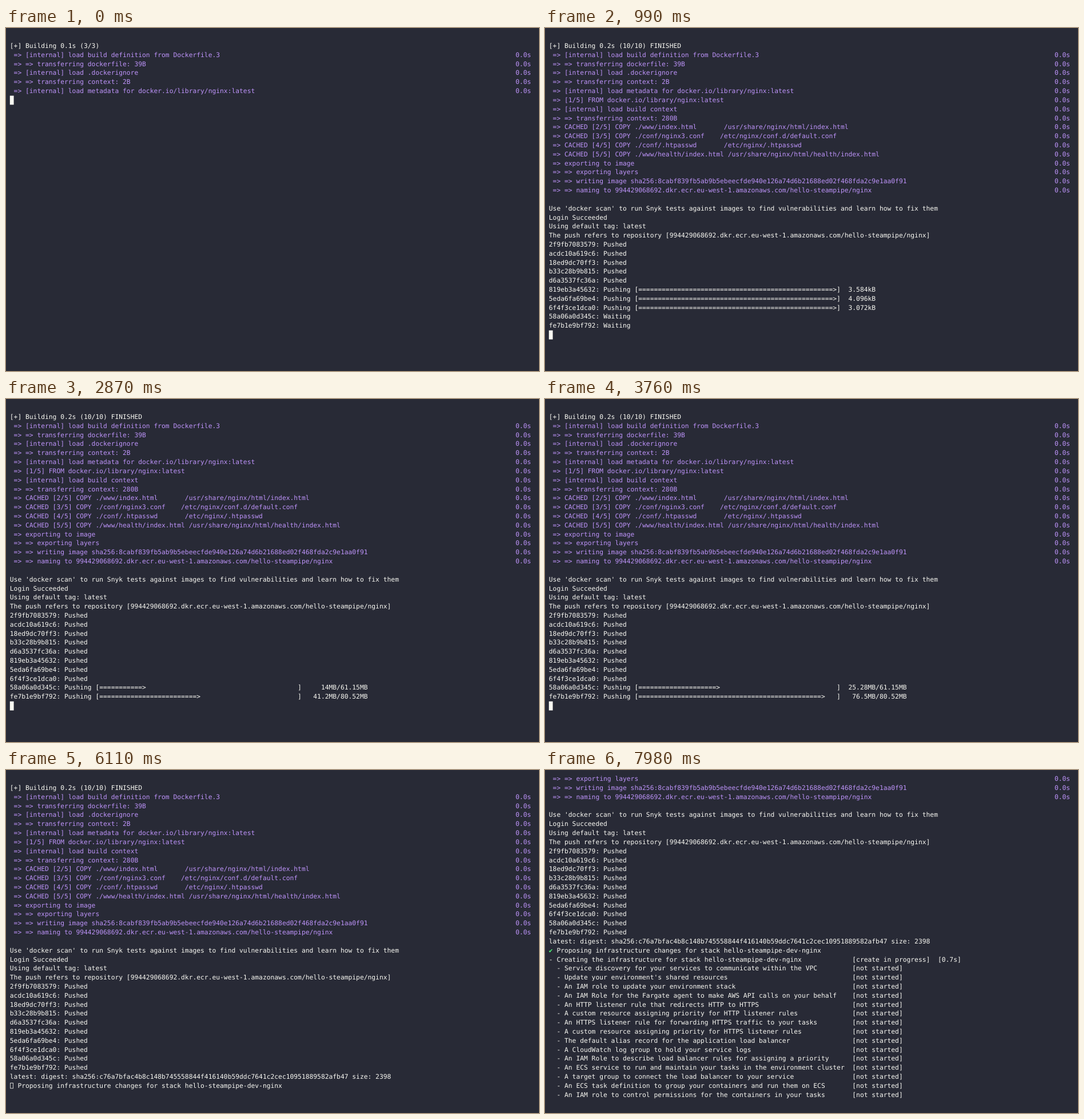
An HTML page for the animation above (8 s loop, 932x601 px).

```html
<!DOCTYPE html>
<html lang="en">
<head>
<meta charset="utf-8">
<title>Container build and deploy</title>
<style>
html, body { margin: 0; width: 100%; height: 100%; overflow: hidden; background: #282a36; }
svg { display: block; width: 932px; height: 601px; }
text {
  font: 11.3px "DejaVu Sans Mono", monospace;
  font-variant-ligatures: none;
  text-rendering: geometricPrecision;
  white-space: pre;
}
</style>
</head>
<body>
<svg id="stage" viewBox="0 0 932 601" xmlns="http://www.w3.org/2000/svg"></svg>
<script>
// The margin is one cell left and right, half a row above and below.
const LOOP = 8000, COLS = 135, ROWS = 37;
const CELL = 932 / (COLS + 2), ROW_H = 601 / (ROWS + 1), LEFT = CELL, TOP = ROW_H / 2;
const BASE = 11.3;
const WHITE = '#f8f8f2', PURPLE = '#bd93f9', GREEN = '#50fa7b';
const REPO = '994429068692.dkr.ecr.eu-west-1.amazonaws.com/hello-steampipe/nginx';
const STACK = 'hello-steampipe-dev-nginx';
const SPIN_ROW = 34;

const BUILD = [
  '[internal] load build definition from Dockerfile.3',
  '=> transferring dockerfile: 39B',
  '[internal] load .dockerignore',
  '=> transferring context: 2B',
  '[internal] load metadata for docker.io/library/nginx:latest',
  '[1/5] FROM docker.io/library/nginx:latest',
  '[internal] load build context',
  '=> transferring context: 280B',
  'CACHED [2/5] COPY ./www/index.html       /usr/share/nginx/html/index.html',
  'CACHED [3/5] COPY ./conf/nginx3.conf    /etc/nginx/conf.d/default.conf',
  'CACHED [4/5] COPY ./conf/.htpasswd       /etc/nginx/.htpasswd',
  'CACHED [5/5] COPY ./www/health/index.html /usr/share/nginx/html/health/index.html',
  'exporting to image',
  '=> exporting layers',
  '=> writing image sha256:8cabf839fb5ab9b5ebeecfde940e126a74d6b21688ed02f468fda2c9e1aa0f91',
  '=> naming to ' + REPO
];

const RESOURCES = [
  'Service discovery for your services to communicate within the VPC',
  "Update your environment's shared resources",
  'An IAM role to update your environment stack',
  'An IAM Role for the Fargate agent to make AWS API calls on your behalf',
  'An HTTP listener rule that redirects HTTP to HTTPS',
  'A custom resource assigning priority for HTTP listener rules',
  'An HTTPS listener rule for forwarding HTTPS traffic to your tasks',
  'A custom resource assigning priority for HTTPS listener rules',
  'The default alias record for the application load balancer',
  'A CloudWatch log group to hold your service logs',
  'An IAM Role to describe load balancer rules for assigning a priority',
  'An ECS service to run and maintain your tasks in the environment cluster',
  'A target group to connect the load balancer to your service',
  'An ECS task definition to group your containers and run them on ECS',
  'An IAM role to control permissions for the containers in your tasks'
];

// Small layers carry a fixed size in MB; large ones a total and a progress path.
const LAYERS = [
  { id: '2f9fb7083579', start: 820, done: 930, size: 0.003584 },
  { id: 'acdc10a619c6', start: 820, done: 990, size: 0.004608 },
  { id: '18ed9dc70ff3', start: 880, done: 990, size: 0.003584 },
  { id: 'b33c28b9b815', start: 880, done: 930, size: 0.003072 },
  { id: 'd6a3537fc36a', start: 880, done: 990, size: 0.004096 },
  { id: '819eb3a45632', start: 930, done: 1110, size: 0.003584 },
  { id: '5eda6fa69be4', start: 990, done: 1170, size: 0.004096 },
  { id: '6f4f3ce1dca0', start: 990, done: 1170, size: 0.003072 },
  { id: '58a06a0d345c', start: 1170, done: 5260, total: 61.15,
    path: [[1170, 0.5243], [1390, 5.374], [1630, 7.582], [1940, 8.138], [2870, 14],
           [3760, 25.28], [4560, 45.7], [4985, 61.4], [5040, 62.04]] },
  { id: 'fe7b1e9bf792', start: 1170, done: 4240, total: 80.52,
    path: [[1170, 0.5571], [1390, 11.4], [2045, 11.4], [2870, 41.2], [3760, 76.5], [3920, 83.41]] }
];

// Screen refreshes: first time, last time, count.
const BURSTS = [
  [0, 0, 1], [40, 150, 2], [420, 670, 6], [820, 930, 3], [990, 990, 1], [1110, 1390, 6],
  [1630, 1630, 1], [1940, 1940, 1], [2100, 2870, 15], [2930, 3710, 15], [3760, 4560, 16],
  [4620, 5040, 9], [5260, 5260, 1], [5630, 5630, 1], [6110, 6110, 1], [7680, 7680, 1],
  [7830, 7980, 4]
];

function snap(t) {
  const [a, b, n] = BURSTS.filter(s => s[0] <= t).pop();
  if (n === 1) return a;
  const step = (b - a) / (n - 1);
  return a + Math.min(n - 1, Math.floor((t - a) / step + 1e-6)) * step;
}

function along(path, t) {
  const i = path.findIndex(p => p[0] > t);
  if (i < 0) return path[path.length - 1][1];
  if (i === 0) return path[0][1];
  const [t0, v0] = path[i - 1], [t1, v1] = path[i];
  return v0 + (v1 - v0) * (t - t0) / (t1 - t0);
}

function humanSize(mb) {
  return mb < 1 ? +(mb * 1000).toPrecision(4) + 'kB' : +mb.toPrecision(4) + 'MB';
}

function pushBar(mb, total) {
  const full = !total || mb > total;
  const n = full ? 50 : Math.floor(Math.floor(mb / total * 100) / 2);
  return 'Pushing [' + '='.repeat(n) + '>' + ' '.repeat(50 - n) + '] ' +
    humanSize(mb).padStart(8) + (full ? '' : '/' + humanSize(total));
}

function layerState(layer, i, t) {
  if (t >= layer.done) return 'Pushed';
  if (t >= layer.start) return pushBar(layer.path ? along(layer.path, t) : layer.size, layer.total);
  const queued = i < 5 ? Infinity : i < 8 ? 620 : 670;
  return t >= queued ? 'Waiting' : 'Preparing';
}

function screen(t) {
  const lines = [];
  const add = (text, color = WHITE) => lines.push({ text, color });
  const built = t >= 40;
  add('');
  add(built ? '[+] Building 0.2s (10/10) FINISHED' : '[+] Building 0.1s (3/3)');
  for (const step of BUILD.slice(0, built ? BUILD.length : 5)) {
    add((' => ' + step).padEnd(130) + '0.0s', PURPLE);
  }
  if (t >= 150) {
    add('');
    add("Use 'docker scan' to run Snyk tests against images to find vulnerabilities and learn how to fix them");
  }
  if (t >= 420) add('Login Succeeded');
  if (t >= 470) add('Using default tag: latest');
  if (t >= 520) add(`The push refers to repository [${REPO}]`);
  if (t >= 570) LAYERS.forEach((l, i) => add(l.id + ': ' + layerState(l, i, t)));
  if (t >= 5630) {
    add('latest: digest: sha256:c76a7bfac4b8c148b745558844f416140b59ddc7641c2cec10951889582afb47 size: 2398');
  }
  if (t >= 6110) add('  Proposing infrastructure changes for stack ' + STACK);
  if (t >= 7830) {
    const secs = t >= 7930 ? '0.7s' : '0.6s';
    add(('- Creating the infrastructure for stack ' + STACK).padEnd(78) + `[create in progress]  [${secs}]`);
    for (const r of RESOURCES) add(('  - ' + r).padEnd(78) + '[not started]');
  }
  return lines;
}

const stage = document.getElementById('stage');
function make(tag, attrs) {
  const el = document.createElementNS('http://www.w3.org/2000/svg', tag);
  for (const k in attrs) el.setAttribute(k, attrs[k]);
  return stage.appendChild(el);
}
const rowTop = r => TOP + r * ROW_H;
const show = (el, on) => el.setAttribute('visibility', on ? 'visible' : 'hidden');

make('rect', { width: 932, height: 601, fill: '#282a36' });
const rows = Array.from({ length: ROWS }, (_, r) => make('text', { x: LEFT, y: rowTop(r) + BASE }));
const cursor = make('rect', { x: LEFT, width: CELL, height: ROW_H, fill: WHITE });
const spinner = make('rect', {
  x: LEFT + 0.9, y: rowTop(SPIN_ROW) + 2.8, width: 4.8, height: 9.4,
  fill: 'none', stroke: WHITE, 'stroke-width': 0.8
});
const check = make('text', { x: LEFT, fill: GREEN });
check.textContent = '✔';

let last = -1;
function draw(t) {
  const now = snap(t);
  if (now === last) return;
  last = now;
  const lines = screen(now);
  const scroll = Math.max(0, lines.length + 1 - ROWS);
  rows.forEach((el, r) => {
    const line = lines[r + scroll];
    el.textContent = line ? line.text : '';
    el.setAttribute('fill', line ? line.color : WHITE);
  });
  cursor.setAttribute('y', rowTop(lines.length - scroll));
  check.setAttribute('y', rowTop(SPIN_ROW - scroll) + BASE);
  show(cursor, now < 6110 || (now >= 7680 && now < 7830));
  show(spinner, now >= 6110 && now < 7680);
  show(check, now >= 7680);
}

const origin = performance.now();
function tick() {
  draw((performance.now() - origin) % LOOP);
  requestAnimationFrame(tick);
}
tick();
</script>
</body>
</html>
```
